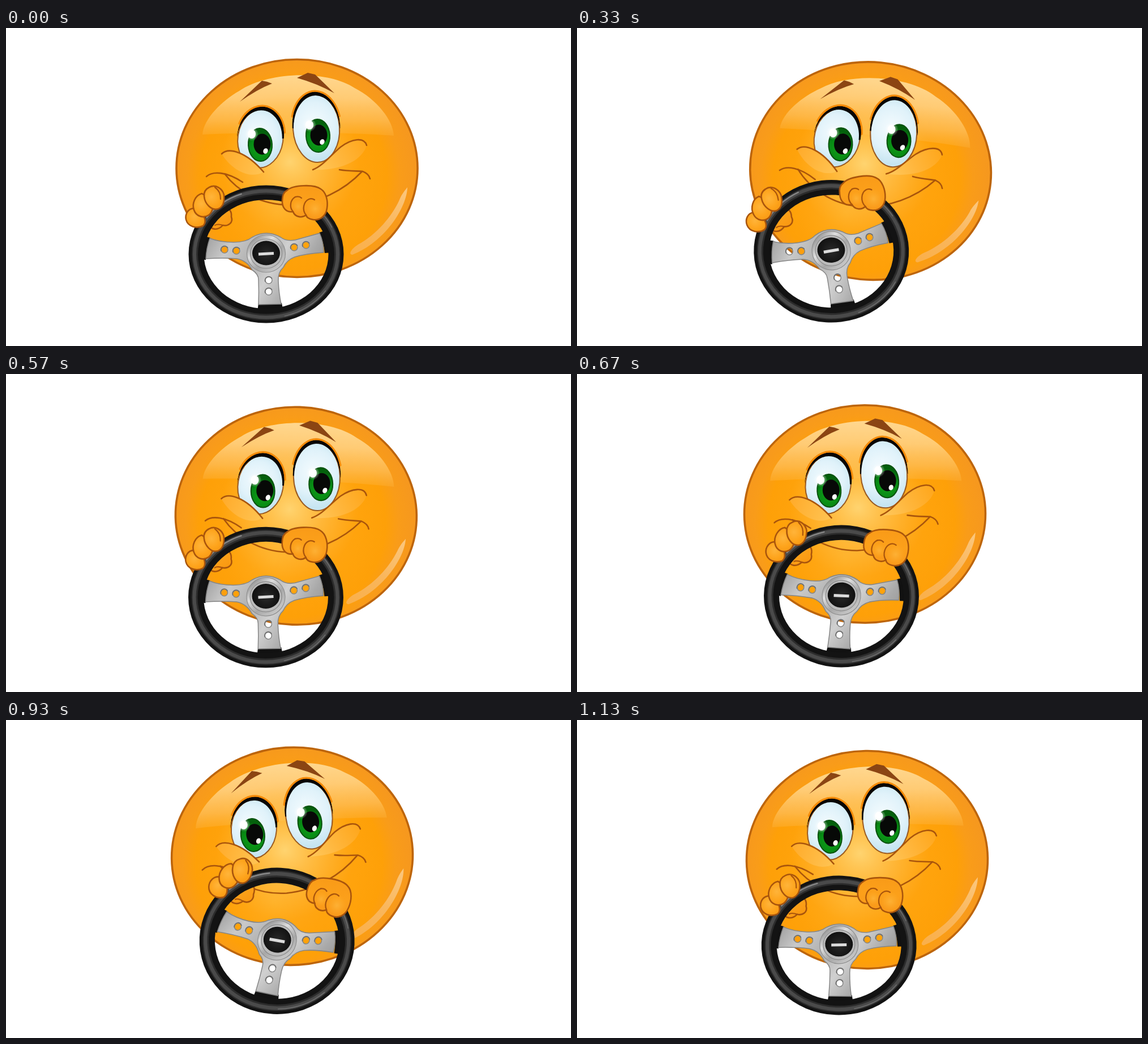
Recreate the animation shown at these times as an HTML page with a canvas. Size 998 by 561 pixels, loop 1160 ms.

```html
<!DOCTYPE html>
<html lang="en">
<head>
<meta charset="utf-8">
<title>Smiley at the wheel</title>
<style>
html, body { margin: 0; width: 100%; height: 100%; overflow: hidden; background: #fff; }
canvas { display: block; width: 998px; height: 561px; }
</style>
</head>
<body>
<canvas id="stage" width="998" height="561"></canvas>
<script>
const ctx = document.getElementById('stage').getContext('2d');
const LOOP = 1160, STEPS = 35, RAD = Math.PI / 180;
const LINE = '#a9550c';

// Pose keys, in steps of 1/30 s; the curves through them are periodic.
const KEYS = [0, 5, 14, 20, 25, 31, 34];
const POSE = {
  headX: [514, 518.5, 516, 508.5, 504.5, 508.5, 512.5],
  headY: [247.5, 249.5, 252.5, 247, 241, 242, 246.5],
  headTurn: [0, 4.8, 4.1, -0.3, -3.5, -2.5, -0.8],
  glance: [0, 5.5, 7, 2, -2.5, -1, 0],
  wheelX: [459.5, 451.5, 452.5, 467, 480, 472.3, 462.7],
  wheelTop: [277, 265, 271, 266, 259, 265, 274],
  wheelBottom: [521, 520, 520, 518, 519, 520, 521],
  wheelTurn: [0, -5.4, -5, 6.2, 14.5, 10, 2.6]
};

function spline(values, t) {
  const n = KEYS.length;
  const wrap = j => (j + n) % n;
  const time = j => KEYS[wrap(j)] + STEPS * Math.floor(j / n);
  const value = j => values[wrap(j)];
  const rate = j => (value(j + 1) - value(j)) / (time(j + 1) - time(j));
  const slope = j => {
    const before = time(j) - time(j - 1), after = time(j + 1) - time(j);
    return (after * rate(j - 1) + before * rate(j)) / (before + after);
  };
  let k = n - 1;
  while (KEYS[k] > t) k--;
  const h = time(k + 1) - time(k), u = (t - time(k)) / h, w = 1 - u;
  return value(k) * w * w * (1 + 2 * u) + value(k + 1) * u * u * (3 - 2 * u)
    + h * u * w * (slope(k) * w - slope(k + 1) * u);
}

function stops(gradient, list) {
  list.forEach(([at, color]) => gradient.addColorStop(at, color));
  return gradient;
}
const linear = (x0, y0, x1, y1, ...list) => stops(ctx.createLinearGradient(x0, y0, x1, y1), list);
const radial = (x, y, r, ...list) => stops(ctx.createRadialGradient(x, y, 0, x, y, r), list);

function paint(path, fill, stroke, width = 2.6) {
  if (typeof path === 'string') path = new Path2D(path);
  if (fill) { ctx.fillStyle = fill; ctx.fill(path, 'evenodd'); }
  if (stroke) { ctx.strokeStyle = stroke; ctx.lineWidth = width; ctx.stroke(path); }
}
function arc(x, y, rx, ry, turn, from, to) {
  const path = new Path2D();
  path.ellipse(x, y, rx, ry, turn * RAD, from * RAD, to * RAD);
  return path;
}
const oval = (x, y, rx, ry, turn = 0) => arc(x, y, rx, ry, turn, 0, 360);

function glow(x, y, r, color, clear) {
  paint(oval(x, y, r, r), radial(x, y, r, [0, color], [1, clear]));
}

// lean shifts the heavy upper lid towards one side of the eye
function drawEye(x, y, rx, ry, turn, lean) {
  paint(arc(x, y - 3, rx + 2, ry + 2, turn, 200, 345), null, '#f58a08', 5);
  paint(oval(x, y, rx, ry, turn), radial(x - 5, y - 8, ry * 1.05,
    [0, '#f4fbfe'], [0.6, '#e0f2fa'], [1, '#c6e5f1']), '#9a5a20', 2);
  const lid = oval(x, y - 3, rx + 1.5, ry + 1.5, turn);
  ctx.save();
  ctx.clip(lid);
  ctx.beginPath();
  ctx.rect(x - 60, y - 80, 120, 80);
  ctx.clip();
  lid.addPath(oval(x + lean, y + 3, rx, ry + 1, turn));
  paint(lid, '#090604');
  ctx.restore();
}

function drawIris(x, y, px, py) {
  paint(oval(x, y, 21, 29, -3), radial(x, y + 8, 30,
    [0, '#12a01a'], [0.65, '#078a14'], [1, '#04600c']), '#08520e', 2);
  paint(oval(px, py, 15, 18.5), '#070907');
  glow(x - 15, y - 19, 12, '#fff', 'rgba(255,255,255,0)');
  paint(oval(x - 15, y - 19, 7, 8), '#fff');
  paint(oval(px + 6, py + 12, 4, 5, 25), '#fff');
}

function drawHead(glance) {
  paint(oval(514, 247.5, 213, 192), radial(508, 262, 216,
    [0, '#ffa71e'], [0.55, '#ffa30c'], [0.76, '#fea008'], [0.87, '#f99c19'], [1, '#f6981e']), '#bd650c', 3.6);

  paint('M347 188C349 160 382 128 412 111C462 77 566 73 616 106C655 126 684 163 685 190C590 183 440 183 347 188Z',
    linear(0, 80, 0, 191, [0, '#ffd891'], [0.4, '#ffcb74'], [0.75, 'rgba(254,186,78,.85)'], [1, 'rgba(253,178,58,.35)']));
  glow(502, 236, 122, 'rgba(255,214,116,.95)', 'rgba(255,190,70,0)');
  glow(478, 325, 85, 'rgba(255,196,68,.3)', 'rgba(255,176,40,0)');
  paint('M709 281C708 318 668 378 612 400C603 399 612 388 622 382C655 364 682 332 695 303C699 293 705 286 709 281Z',
    linear(705, 290, 620, 400, [0, '#fbc57a'], [0.5, '#f9b65c'], [1, '#fab04b']));

  drawEye(449.5, 195, 40, 52, 8, -2);
  drawEye(548, 177, 41, 60, -4, 1);
  drawIris(449 + glance, 206, 452.5 + glance, 205);
  drawIris(551 + glance, 190, 552.5 + glance, 189);

  paint('M413 130L452 93Q461 94 470 98Q444 108 413 130Z', '#8b4513');
  paint('M514 88L533 79L546 82L580 115Q550 98 514 88Z', '#8b4513');

  // cheeks
  const leftCheek = 'M381 222C393 210 424 218 455 254';
  const rightCheek = 'M542 250C560 243 573 225 591 210C611 195 633 192 637 207';
  paint(leftCheek + 'C430 268 398 250 381 222Z', linear(381, 225, 450, 250, [0, '#ffab2a'], [1, '#ffc250']));
  paint(rightCheek + 'C630 232 595 252 542 250Z', linear(545, 248, 632, 205, [0, '#ffc85c'], [0.5, '#ffb63c'], [1, '#ffa81e']));
  paint(leftCheek, null, LINE);
  paint(rightCheek, null, LINE);

  // smile
  paint('M354 262C365 252 389 253 418 272', null, LINE);
  paint('M386 257C410 289 451 312 500 312C551 310 597 287 629 253', null, LINE);
  paint('M589 250C606 253 621 252 630 253Q641 257 643 266', null, LINE);
}

function drawPalm() {
  paint('M383 318C395 316 399 324 398 333C402 344 392 350 383 348C374 358 361 356 360 347C358 334 368 323 383 318Z',
    linear(365, 320, 390, 356, [0, '#ffa820'], [1, '#f8960f']), LINE);
  paint('M383 348Q374 345 369 348', null, LINE, 2);
}

function drawSpokes() {
  const holes = [[386, 391], [407, 393], [509, 387], [530, 383], [464, 445], [464, 465]];

  // dark mounts where the spokes meet the rim
  paint('M344 366L361 370Q353 388 353 409L340 408Z', '#111');
  paint('M553 361L573 354L578 396L563 397Q561 376 553 361Z', '#111');
  paint('M446 485L487 485L490 500L444 500Z', '#111');

  const metal = new Path2D('M360 371Q378 378 402 378Q424 378 435 369Q460 355 485 369Q495 377 511 374L554 362Q561 378 561 396'
    + 'Q530 398 510 404Q496 409 490 422Q480 431 481 446Q482 468 486 487L446 488Q447 465 446 444Q446 434 435 427'
    + 'Q425 410 408 407Q384 405 353 407Q354 388 360 371Z');
  holes.forEach(([x, y]) => metal.addPath(oval(x, y, 6, 6)));
  paint(metal, linear(360, 365, 545, 480,
    [0, '#a3a3a3'], [0.18, '#c9c9c9'], [0.4, '#b0b0b0'], [0.58, '#d0d0d0'], [0.78, '#a9a9a9'], [1, '#8d8d8d']), '#858585', 1.5);
  holes.forEach(([x, y]) => paint(arc(x, y, 6.5, 6.5, 0, 160, 330), null, '#6e6e6e', 1.6));

  paint(oval(459.5, 398, 34, 33), linear(435, 370, 485, 428,
    [0, '#8c8c8c'], [0.3, '#dedede'], [0.6, '#a7a7a7'], [1, '#cfcfcf']), '#8f8f8f', 1.2);
  paint(oval(459.5, 398, 28, 26), '#bcbcbc', '#8a8a8a', 1.2);
  paint(oval(459.5, 397, 24.5, 21.5), radial(460, 398, 25, [0, '#292929'], [1, '#101010']));
  ctx.lineCap = 'butt';
  paint('M446 399L473 397.5', null, '#dcdcdc', 5);
  ctx.lineCap = 'round';
}

function drawRim() {
  const x = 459.5, y = 399;
  const ring = oval(x, y, 137, 121.5);
  ring.addPath(oval(x, y, 110, 96));
  paint(ring, '#131313');
  paint(oval(x, y, 126, 111), null, '#2c2c2c', 11);
  paint(oval(x, y, 126.5, 111.5), null, '#4a4a4a', 6);
  paint(arc(x, y, 128, 113, 0, 215, 250), null, '#858585', 2.5);
  paint(arc(x, y, 128, 113, 0, 300, 335), null, '#666', 2);
  paint(arc(x, y, 128, 113, 0, 35, 75), null, '#666', 2);
}

function drawFingers() {
  const skin = (x, y, r) => radial(x, y, r, [0, '#ffb43a'], [0.55, '#fea41c'], [1, '#f69611']);
  // left hand
  paint('M333 318C321 318 316 329 318 338C321 350 336 355 348 349C354 344 352 333 345 327Z', skin(333, 332, 25), LINE);
  paint('M346 292C334 295 328 310 332 321C336 333 349 336 358 330C367 323 367 310 361 301Z', skin(345, 310, 27), LINE);
  paint('M359 281C370 275 382 283 385 294C386 304 384 315 375 319C362 323 351 309 350 297C349 289 353 284 359 281Z',
    skin(363, 298, 27), LINE);
  paint('M369 281C377 287 379 293 379 302', null, LINE, 2.2);

  // right hand
  paint('M497 286C507 277 544 275 556 284C566 290 569 306 567 318C565 333 553 340 542 338C535 337 531 334 530 330'
    + 'C522 336 510 333 507 324C495 326 487 317 488 304C488 295 491 289 497 286Z',
    linear(528, 279, 528, 340, [0, '#f99b18'], [0.45, '#fca01a'], [1, '#f9981a']), LINE);
  glow(546, 319, 17, 'rgba(255,190,72,.6)', 'rgba(255,180,50,0)');
  glow(516, 315, 12, 'rgba(255,190,72,.55)', 'rgba(255,180,50,0)');
  paint('M507 324C500 316 502 303 511 298', null, LINE, 2.3);
  paint('M530 330C522 320 526 306 535 302Q540 300 545 303', null, LINE, 2.3);
  paint('M511 298Q518 296 522 300', null, LINE, 2.3);
}

function stepAt(ms) {
  let step = 0;
  while (step < STEPS - 1 && Math.round((step + 1) * 10 / 3) * 10 <= ms) step++;
  return step;
}

function draw(ms) {
  const step = stepAt(ms), pose = {};
  for (const name in POSE) pose[name] = spline(POSE[name], step);

  ctx.fillStyle = '#fff';
  ctx.fillRect(0, 0, 998, 561);
  ctx.lineCap = ctx.lineJoin = 'round';

  ctx.save();
  ctx.translate(pose.headX, pose.headY);
  ctx.rotate(pose.headTurn * RAD);
  ctx.translate(-514, -247.5);
  drawHead(pose.glance);
  ctx.restore();

  // the wheel turns as a circle, then is foreshortened vertically
  const radius = 137.5;
  ctx.save();
  ctx.translate(pose.wheelX, (pose.wheelTop + pose.wheelBottom) / 2);
  ctx.scale(1, (pose.wheelBottom - pose.wheelTop) / 2 / radius);
  ctx.rotate(pose.wheelTurn * RAD);
  ctx.scale(1, radius / 122);
  ctx.translate(-459.5, -399);
  drawPalm();
  drawSpokes();
  drawRim();
  drawFingers();
  ctx.restore();
}

function tick() {
  draw(performance.now() % LOOP);
  requestAnimationFrame(tick);
}
tick();
</script>
</body>
</html>
```
